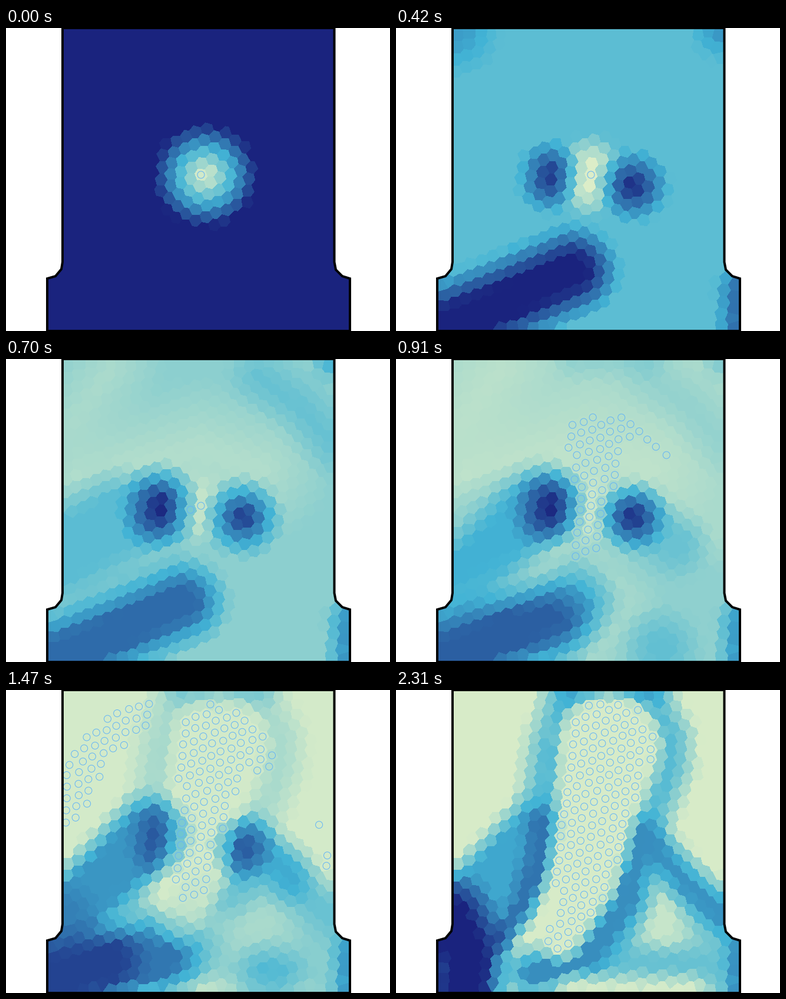
Write a matplotlib script that moves like this. It is 652 by 514 pixels and loops after 2.38 s.

```python
import numpy as np
import matplotlib.pyplot as plt
from matplotlib.animation import FuncAnimation
from matplotlib.path import Path

W, H, DPI = 652, 514, 100
FRAMES, INTERVAL = 34, 70
PX = 72 / DPI
START = np.array([331, 249])
OUTLINE = [(96, 0), (557.5, 0), (557.5, 397), (560, 410), (571, 421), (584, 425),
           (584, 514), (70, 514), (70, 425), (84, 421), (94, 409), (96, 397)]


def nearest(points, seeds):
    norm = (seeds ** 2).sum(1)
    parts = np.array_split(points, max(1, len(points) // 20000))
    return np.concatenate([np.argmin(norm - 2 * p @ seeds.T, axis=1) for p in parts])


def build_mesh(domain, pixels):
    """Tilted, slightly shaken hexagonal lattice, evened out by Lloyd relaxation."""
    rng = np.random.default_rng(4)
    i, j = (k.reshape(-1, 1) for k in np.mgrid[-45:46, -45:46])
    seeds = START + i * np.array([2.5, -19.6]) + j * np.array([17.6, -6.6])
    seeds = seeds[domain.contains_points(seeds)]
    centre = nearest(START[None], seeds)[0]
    seeds += rng.normal(0, 1.8, seeds.shape)
    for _ in range(6):
        seeds[centre] = START
        owner = nearest(pixels, seeds)
        size = np.maximum(np.bincount(owner, minlength=len(seeds)), 1)
        seeds = np.column_stack([np.bincount(owner, axis, len(seeds)) / size
                                 for axis in pixels.T])
    seeds[centre] = START
    return seeds


domain = Path(OUTLINE + OUTLINE[:1])
yy, xx = np.mgrid[0:H, 0:W]
grid = np.column_stack([xx.ravel(), yy.ravel()]) + 0.5
inside = domain.contains_points(grid)
pixels = grid[inside]
cells = build_mesh(domain, pixels[::7])
owner = nearest(pixels, cells)


def distance(*path):
    """Distance of every cell from a path of (x, y) or (x, y, radius) points."""
    best = np.full(len(cells), np.inf)
    for a, b in zip(path, path[1:] or path):
        a, step = np.array(a, float), np.subtract(b, a)
        along = step[:2]
        t = np.clip((cells - a[:2]) @ along / max(along @ along, 1e-9), 0, 1)
        d = np.hypot(*(cells - a[:2] - t[:, None] * along).T)
        if len(a) == 3:
            d -= a[2] + t * step[2]
        best = np.minimum(best, d)
    return best


def paint(base, *strokes):
    """Soft strokes (distance, value, inner, outer) laid over an even base."""
    field = np.full(len(cells), float(base))
    for d, value, inner, outer in strokes:
        field += (value - field) * np.clip((outer - d) / (outer - inner), 0, 1)
    return field


# Regions that take part in several stages.
origin = distance(START)
core = distance((331, 232), (326, 270))
left_hole = distance((261, 242), (259, 262))
right_hole = distance((402, 268))
band = distance((70, 510), (190, 462), (300, 412))
slope = distance((85, 400), (170, 320), (245, 240))
edge = distance((587, 515), (587, 445))
corner_left, corner_right = distance((100, 5)), distance((557, 0))
ring_left = distance((286, 10), (260, 95), (248, 190))
ring_right = distance((435, 15), (468, 80), (467, 130), (440, 200))
ceiling = distance((300, 3), (430, 3))
leg = distance((418, 245), (490, 325), (567, 395))
lowland = distance((380, 430), (530, 440))
hill = distance((450, 375), (455, 410))
floor = distance((305, 516), (500, 514))

# Areas covered by rings, as tapered strokes.
wings = np.minimum.reduce([
    distance((230, 45, 58), (150, 95, 62), (100, 200, 68)),
    distance((345, 82, 58), (340, 180, 45), (328, 255, 20), (318, 320, 26)),
    distance((375, 85, 48), (470, 125, 32), (530, 215, 34), (545, 300, 38))])
bulb = distance((362, 90, 68), (335, 210, 48), (318, 310, 42), (295, 400, 16))
club = distance((362, 92, 76), (342, 200, 58), (318, 320, 48), (280, 425, 22))


def settling(base):
    spread = 45 * (base - .385)
    return paint(
        base,
        (core, 1, 6, 46 + spread),
        (left_hole, .06, 0, 47 + spread),
        (right_hole, 0, 2, 57 + spread),
        (band, 0, 27, 75 + spread),
        (corner_left, base - .16, 20, 80),
        (corner_right, base - .22, 5, 62),
        (edge, .4 * base, 8, 50))


spark = paint(0, (distance((338, 250)), 1, 4, 88))

spreading = paint(
    .74,
    (distance((130, 200), (330, 155), (430, 185)), .86, 10, 125),
    (distance((110, 110), (180, 15)), .84, 0, 90),
    (distance((430, 30), (500, 80), (560, 150)), .62, 5, 60),
    (corner_right, .43, 0, 45),
    (distance((96, 330), (190, 275)), .58, 45, 100),
    (core, .92, 10, 48),
    (left_hole, .02, 4, 70),
    (right_hole, .12, 10, 72),
    (band, .25, 27, 84),
    (edge, .33, 5, 50))

winged = paint(
    .96,
    (ceiling, .76, 0, 40),
    (lowland, .76, 80, 140),
    (distance((340, 350), (400, 405), (335, 512)), .92, 5, 55),
    (distance((450, 490)), .42, 20, 75),
    (slope, .38, 36, 78),
    (left_hole, .02, 4, 58),
    (distance((410, 270), (475, 315)), .48, 22, 66),
    (right_hole, .02, 8, 60),
    (distance((75, 490), (190, 465), (258, 455)), .15, 32, 90),
    (edge, .38, 6, 42))

bulbous = paint(
    .985,
    (ring_right, .68, 6, 52),
    (ring_left, .66, 6, 54),
    (ceiling, .56, 4, 42),
    (lowland, .69, 70, 115),
    (hill, .90, 5, 60),
    (leg, .46, 12, 54),
    (distance((415, 240), (398, 320), (372, 355)), .39, 12, 52),
    (slope, .42, 40, 76),
    (distance((248, 225), (243, 300)), .34, 6, 32),
    (distance((215, 390), (230, 465), (335, 455)), .47, 25, 65),
    (floor, .92, 4, 40),
    (distance((105, 380)), .25, 18, 60),
    (distance((70, 485), (165, 460)), .06, 35, 80),
    (edge, .33, 8, 42),
    (bulb, .985, -4, 26))

clubbed = paint(
    .985,
    (ring_right, .57, 6, 50),
    (ring_left, .56, 6, 52),
    (ceiling, .45, 8, 42),
    (lowland, .72, 70, 110),
    (hill, .93, 14, 62),
    (distance((390, 462), (535, 465)), .62, 8, 42),
    (leg, .39, 10, 50),
    (distance((417, 250), (392, 355), (330, 450), (230, 480)), .37, 12, 55),
    (slope, .46, 40, 76),
    (distance((245, 225), (240, 290), (215, 365), (175, 420)), .28, 8, 36),
    (floor, .98, 8, 42),
    (distance((115, 500), (120, 450), (90, 390)), 0, 32, 88),
    (edge, .33, 8, 42),
    (club, .985, -4, 22))

FIELD_KEYS = [0, 3, 6, 10, 17, 26, 33]
FIELDS = [spark, settling(.385), settling(.585), spreading, winged, bulbous, clubbed]
RING_KEYS = [17, 26, 33]
RING_AREAS = [np.clip(area, -40, 40) for area in (wings, bulb, club)]


def blend(keys, fields, frame):
    i = np.clip(np.searchsorted(keys, frame, "right") - 1, 0, len(keys) - 2)
    s = (frame - keys[i]) / (keys[i + 1] - keys[i])
    return fields[i] * (1 - s) + fields[i + 1] * s


def ringed(frame):
    """A front grows inside the wings, which then morph into the later areas."""
    if frame <= 17:
        front = np.interp(frame, [6, 10, 17], [5, 19, 345])
        return (origin < front) & ((wings < 0) | (origin < 5))
    return blend(RING_KEYS, RING_AREAS, frame) < 0


def colours(values):
    stops = np.array([(26, 35, 126), (66, 179, 213), (220, 237, 200)])
    return np.column_stack([np.interp(values, [0, .5, 1], c) for c in stops.T]).round()


fig = plt.figure(figsize=(W / DPI, H / DPI), dpi=DPI, facecolor="white")
ax = fig.add_axes([0, 0, 1, 1])
ax.axis("off")
picture = np.full((H * W, 3), 255, np.uint8)
image = ax.imshow(picture.reshape(H, W, 3), extent=(0, W, H, 0),
                  interpolation="nearest", aspect="auto")
ax.add_patch(plt.Polygon(OUTLINE, fill=False, ec="black", lw=4 * PX, zorder=3))
rings = ax.scatter([], [], s=(12 * PX) ** 2, facecolors="none",
                   edgecolors="#64b5f6", linewidths=PX, zorder=2)
ax.set(xlim=(0, W), ylim=(H, 0))


def draw(frame):
    picture[inside] = colours(blend(FIELD_KEYS, FIELDS, frame))[owner]
    image.set_data(picture.reshape(H, W, 3))
    rings.set_offsets(cells[ringed(frame)])
    return image, rings


animation = FuncAnimation(fig, draw, frames=FRAMES, interval=INTERVAL,
                          repeat=True, repeat_delay=0)
plt.show()
```
